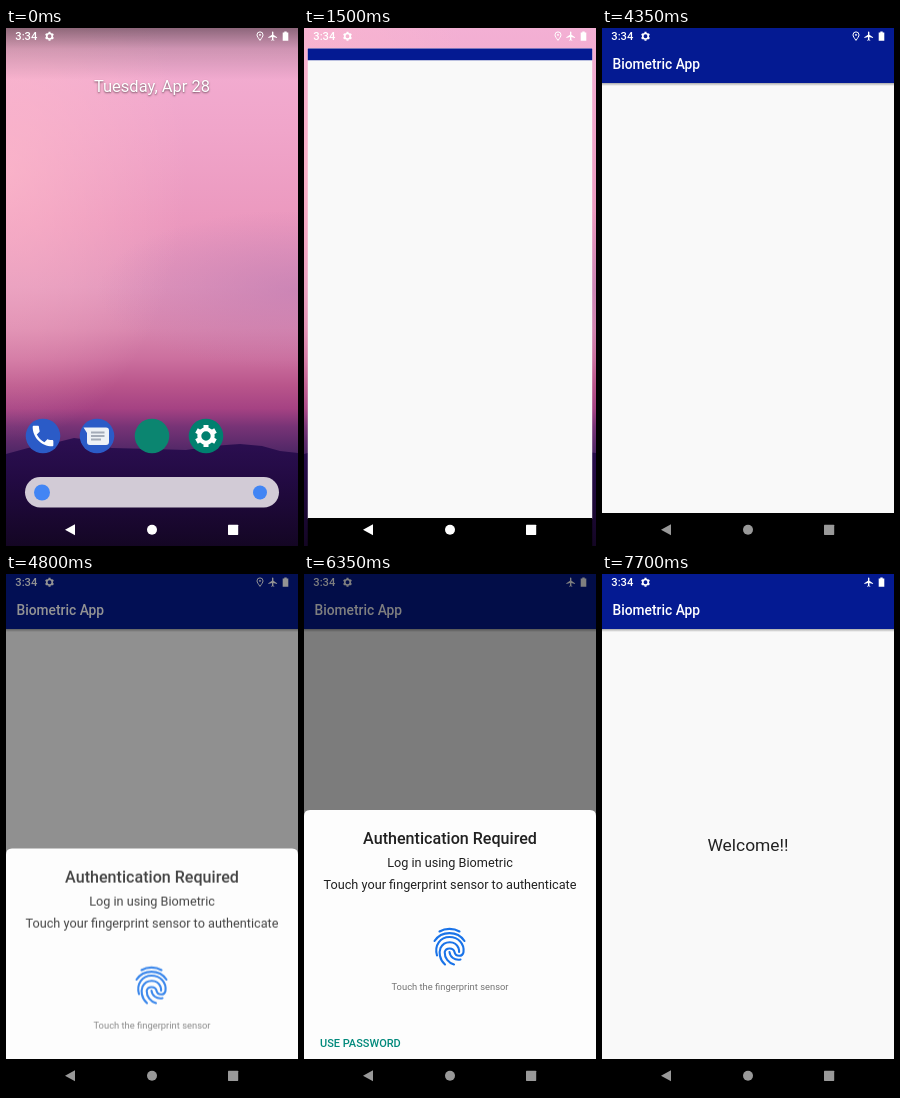
Write an HTML page that moves like this. It is 292 px wide and 518 px high and loops after 7800 ms.

```html
<!DOCTYPE html>
<html lang="en">
<head>
<meta charset="utf-8">
<style>
html, body { margin: 0; width: 100%; height: 100%; overflow: hidden; background: #000; }
svg { display: block; width: 100vw; height: 100vh; font-family: Roboto, sans-serif; }
.mid { text-anchor: middle; }
.bold { font-weight: 500; }
</style>
</head>
<body>
<svg viewBox="0 0 292 518">
  <defs>
    <linearGradient id="sky" x2="0" y2="1">
      <stop offset="0" stop-color="#f3b0d4"/>
      <stop offset=".2" stop-color="#f0a5ca"/>
      <stop offset=".38" stop-color="#eb98be"/>
      <stop offset=".5" stop-color="#e094bb"/>
      <stop offset=".58" stop-color="#d886ae"/>
      <stop offset=".64" stop-color="#cb6f9e"/>
      <stop offset=".69" stop-color="#b9558b"/>
      <stop offset=".735" stop-color="#a54283"/>
      <stop offset=".77" stop-color="#773376"/>
      <stop offset=".82" stop-color="#4f2766"/>
    </linearGradient>
    <radialGradient id="glow" cx="0" cy=".32" r=".62">
      <stop offset="0" stop-color="#ffbccb" stop-opacity=".65"/>
      <stop offset="1" stop-color="#ffbccb" stop-opacity="0"/>
    </radialGradient>
    <radialGradient id="haze">
      <stop offset="0" stop-color="#bf7cb2" stop-opacity=".6"/>
      <stop offset="1" stop-color="#bf7cb2" stop-opacity="0"/>
    </radialGradient>
    <linearGradient id="hill" x2="0" y2="1">
      <stop offset="0" stop-color="#2c0f52"/>
      <stop offset=".4" stop-color="#220a42"/>
      <stop offset="1" stop-color="#140624"/>
    </linearGradient>
    <linearGradient id="shade" x2="0" y2="1">
      <stop offset="0" stop-opacity=".42"/>
      <stop offset=".4" stop-opacity=".15"/>
      <stop offset="1" stop-opacity="0"/>
    </linearGradient>
    <linearGradient id="edge" x2="0" y2="1">
      <stop offset="0" stop-opacity=".32"/>
      <stop offset="1" stop-opacity="0"/>
    </linearGradient>
    <clipPath id="crop"><rect id="cropBox"/></clipPath>
    <clipPath id="aboveNav"><path d="M0 0h292v485H0z"/></clipPath>
    <g id="gear" fill="none" stroke="#fff">
      <circle r="6.7" stroke-width="4"/>
      <path stroke-width="5" d="M0-7V-11M0 7V11M6.1-3.5L9.5-5.5M-6.1 3.5L-9.5 5.5M6.1 3.5L9.5 5.5M-6.1-3.5L-9.5-5.5"/>
    </g>
  </defs>

  <path fill="url(#sky)" d="M0 0h292v518H0z"/>
  <path fill="url(#glow)" d="M0 0h292v440H0z"/>
  <ellipse fill="url(#haze)" cx="292" cy="262" rx="200" ry="80"/>
  <path fill="url(#hill)" d="M0 426L22 420 48 415 68 410 76 411 90 417 106 420 146 421 180 422 206 418 234 416 256 418 274 423 292 425V518H0z"/>

  <g id="home">
    <path fill="url(#shade)" d="M0 0h292v52H0z"/>
    <text class="mid" x="146" y="64" font-size="16.5" fill="#fff" style="text-shadow:0 1px 2px #0008">Tuesday, Apr 28</text>
    <g fill="#2b5bc7">
      <circle cx="37" cy="408" r="17.3"/>
      <circle cx="91" cy="408" r="17.3"/>
      <circle cx="200" cy="408" r="17.3" fill="#00806f"/>
    </g>
    <path fill="#fff" transform="translate(23.2 394.2) scale(1.15)" d="M6.62 10.79c1.44 2.83 3.76 5.14 6.59 6.59l2.2-2.2c.27-.27.67-.36 1.02-.24 1.12.37 2.33.57 3.57.57.55 0 1 .45 1 1V20c0 .55-.45 1-1 1-9.39 0-17-7.61-17-17 0-.55.45-1 1-1h3.5c.55 0 1 .45 1 1 0 1.25.2 2.45.57 3.57.11.35.03.74-.25 1.02z"/>
    <path fill="#eef1f6" d="M77.500 399.500H100q3 0 3 3V414q0 3-3 3H84q-3 0-3-3V405z"/>
    <path fill="none" stroke="#a4abb8" stroke-width="1.8" d="M85 404.500H98.500M85 408H98.500M85 411.500H95"/>
    <use href="#gear" transform="translate(200 408)"/>
    <rect x="19" y="449" width="254" height="30.500" rx="15.200" fill="#d2cbd6"/>
    <circle cx="36" cy="464.500" r="8" fill="#4285f4"/>
    <circle cx="254" cy="464.500" r="7" fill="#4285f4"/>
  </g>

  <g id="app" clip-path="url(#crop)">
    <g id="page">
      <path fill="#f9f9f9" d="M0 0h292v486H0z"/>
      <path fill="#041a92" d="M0 0h292v16H0z"/>
      <path d="M0 485h292v33H0z"/>
      <g id="bar">
        <path fill="#041a92" d="M0 15h292v40H0z"/>
        <path fill="url(#edge)" d="M0 55h292v3H0z"/>
        <text class="bold" x="10.500" y="41" font-size="13.800" fill="#fff">Biometric App</text>
      </g>
      <text id="hello" class="mid" x="146" y="277" font-size="17.400" fill="#222">Welcome!!</text>
    </g>
  </g>
  <circle id="icon" cx="146" fill="#0b8570"/>

  <g fill="#fff">
    <text class="bold" x="9.300" y="12.300" font-size="11.200">3:34</text>
    <use href="#gear" transform="translate(43.500 8.300) scale(.41)"/>
    <g id="pin" fill="none" stroke="#fff">
      <path d="M254 12.400C252.300 10 251 8.300 251 6.900a3 3 0 0 1 6 0C257 8.300 255.700 10 254 12.400z"/>
      <circle cx="254" cy="6.900" r=".6"/>
    </g>
    <path transform="translate(261.400 2.700) scale(.46)" d="M21 16v-2l-8-5V3.500a1.500 1.500 0 0 0-3 0V9l-8 5v2l8-2.500V19l-2 1.500V22l3.500-1 3.500 1v-1.500L13 19v-5.500l8 2.500z"/>
    <path d="M278.300 3.600h2.400v1h1.600v8.200h-5.600V4.600h1.600z"/>
  </g>

  <g clip-path="url(#aboveNav)">
    <path id="dim" d="M0 0h292v485H0z"/>
    <g id="sheet">
      <path fill="#fdfdfd" d="M0 500V242q0-6 6-6H286q6 0 6 6V500z"/>
      <g id="content" class="mid" fill="#212121">
        <text class="bold" x="146" y="269.500" font-size="16.100">Authentication Required</text>
        <text x="146" y="292.500" font-size="12.700">Log in using Biometric</text>
        <text x="146" y="314.700" font-size="12.700">Touch your fingerprint sensor to authenticate</text>
        <g transform="translate(145.500 373)" fill="none" stroke="#1a73e8" stroke-width="2.100" stroke-linecap="round">
          <path d="M-10-15.500C-4-19 4-19 10-15.500M-15-6C-8-16.500 8-16.500 15-6"/>
          <path d="M-12.500 8.500C-15.500-2-9-10 0-10C9-10 15-3 14 5C13.300 10 6 10 5 5C4 .5-3.500 0-4.800 5C-5 11-1 16 4.500 17.500"/>
          <path d="M-4.500 17.500C-10.500 12-10.500 5-9 1C-5-7 6-6.500 9 1Q9.700 3 9.600 5M0 5C.5 10 5 13.500 11 12.500"/>
        </g>
        <text x="146" y="416.300" font-size="9.400" fill="#757575">Touch the fingerprint sensor</text>
        <text class="bold" x="16" y="473" font-size="11" fill="#00897b" text-anchor="start">USE PASSWORD</text>
      </g>
    </g>
  </g>

  <g id="nav">
    <path d="M59 501.700L69 496.200V507.200z"/>
    <circle cx="146" cy="501.700" r="5"/>
    <rect x="222" y="496.700" width="10.200" height="10.200" rx=".6"/>
  </g>
</svg>
<script>
const LOOP = 7800;
const el = id => document.getElementById(id);
const set = (id, attrs) => { for (const k in attrs) el(id).setAttribute(k, attrs[k]); };
const show = (id, on) => { el(id).style.display = on ? '' : 'none'; };
const span = (t, from, to) => Math.min(1, Math.max(0, (t - from) / (to - from)));
const out = (x, power) => 1 - (1 - x) ** power;
const mix = (a, b, p) => a + (b - a) * p;

// The window grows out of its icon; width, height and centre settle at different rates.
function launch(t) {
  const x = span(t, 1250, 1610), p = out(x, 3);
  const start = mix(34.6, 37.6, span(t, 1200, 1250));
  const w = mix(start, 292, p);
  const h = mix(start, 518, out(x, 2.65));
  const cy = mix(408, 259, out(x, 2.23));
  show('app', t > 1250);
  set('cropBox', { x: 146 - w / 2, y: cy - h / 2, width: w, height: h, rx: w / 2 * (1 - p) ** 1.5 });
  set('page', { transform: `translate(146 ${cy}) scale(${w / 292}) translate(-146 -259)` });
  set('icon', { cy, r: w / 2, opacity: Math.max(0, 1 - p * 1.4) });
  set('home', { opacity: 1 - span(t, 1250, 1420) });
}

function dialog(t) {
  const enter = out(span(t, 4708, 4958), 4);
  const leave = out(span(t, 6360, 6600), 2);
  const alpha = enter * (1 - leave);
  show('sheet', alpha > 0);
  set('dim', { opacity: alpha / 2 });
  set('sheet', { transform: `translate(0 ${248 * (1 - enter + leave)})`, opacity: 1 - leave });
  set('content', { opacity: enter });
}

function tick() {
  const t = performance.now() % LOOP;
  launch(t);
  dialog(t);
  show('bar', t >= 4300);
  show('hello', t >= 6400);
  show('pin', t < 5100);
  const grey = Math.round(mix(255, 153, out(span(t, 1600, 3200), 2)));
  set('nav', { fill: `rgb(${grey},${grey},${grey})` });
  requestAnimationFrame(tick);
}
tick();
</script>
</body>
</html>
```
